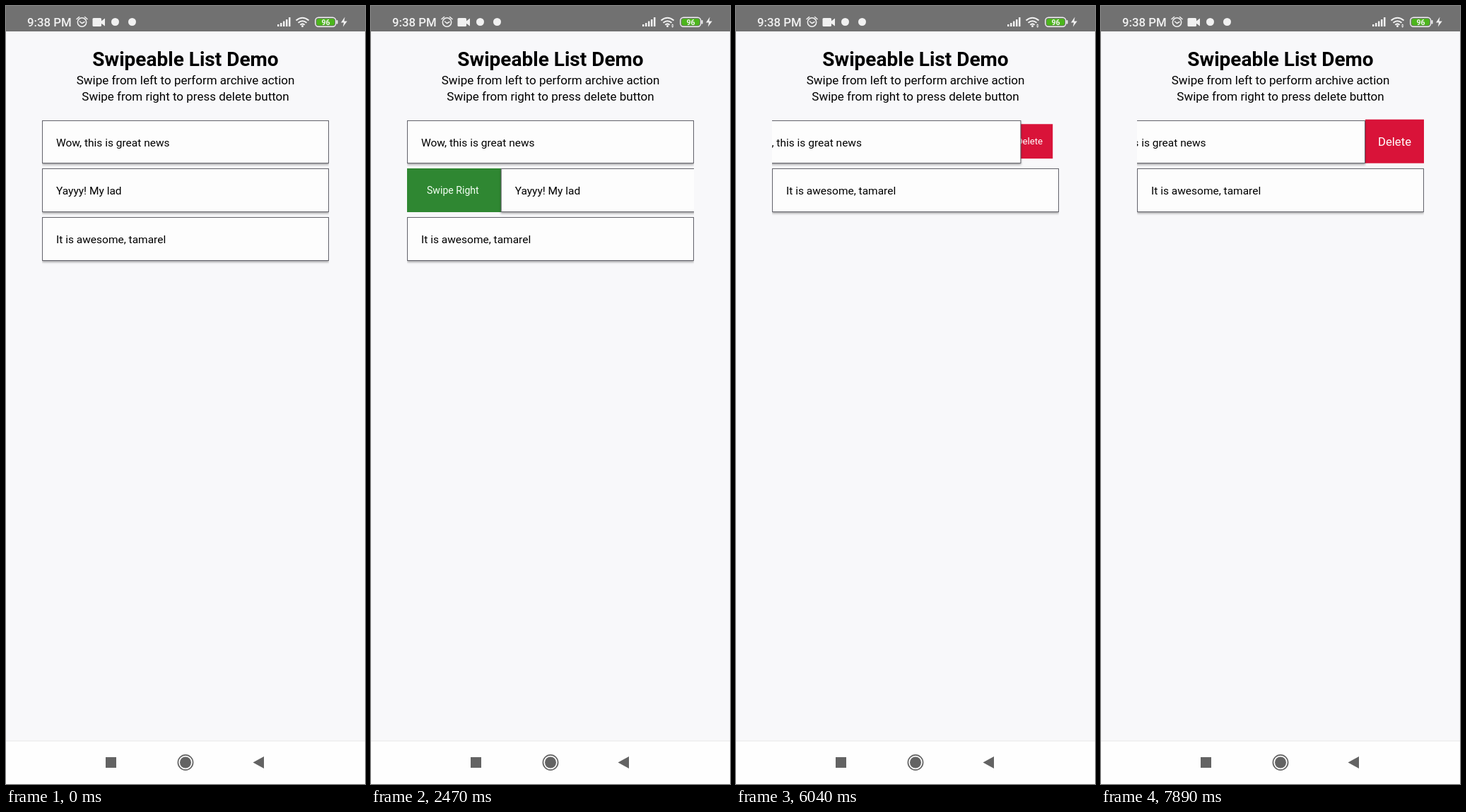
These frames come from a looping animation (508x1102 px, 8 s). An HTML page:

```html
<!DOCTYPE html>
<html lang="en">
<head>
<meta charset="utf-8">
<title>Swipeable List Demo</title>
<style>
  html, body { margin: 0; width: 100%; height: 100%; overflow: hidden; background: #f8f8fa; }
  svg { display: block; font-family: Roboto, sans-serif; }
  .item { font-size: 15.5px; }
  .card rect { fill: #fdfdfd; stroke: #62626a; filter: drop-shadow(0 2px 1.6px rgba(0, 0, 0, .32)); }
</style>
</head>
<body>
<svg id="stage" width="508" height="1102" viewBox="0 0 508 1102">
  <rect width="508" height="1102" fill="#f8f8fa"/>

  <!-- status bar -->
  <rect width="508" height="36" fill="#717171"/>
  <g fill="#f1f1f1">
    <text x="30" y="28.5" font-size="16.8" font-weight="500">9:38 PM</text>
    <g fill="none" stroke="#f1f1f1" stroke-width="1.5" stroke-linecap="round">
      <circle cx="107.5" cy="23" r="6.2"/>
      <path d="M104.5 22l3 2.5 3.5-2M100 18.500l3.500-3M115 18.500l-3.500-3"/>
    </g>
    <rect x="122.500" y="17" width="12.500" height="12" rx="1.500"/>
    <path d="M134 22l6-4.500v11l-6-4.500z"/>
    <circle cx="154.500" cy="22.500" r="5.500"/>
    <circle cx="178.500" cy="22.500" r="5.500"/>
    <path d="M384 26h2.500v3H384zM388 24h2.500v5H388zM392 21.500h2.500V29H392zM396 19h2.500v10H396zM400 16h2.500v13H400z"/>
    <g fill="none" stroke="#f1f1f1" stroke-width="2">
      <path d="M410.500 20.500q9-7.500 18 0M413.500 23.700q6-5 12 0M416.300 26.700q3.200-2.600 6.400 0"/>
    </g>
    <circle cx="419.500" cy="28.500" r="1.500"/>
    <path id="traffic" d="M425 27.500l1.700-2.300 1.700 2.300zM425 28.500h3.400l-1.700 2.300z"/>
    <rect x="437.700" y="16.200" width="29" height="13" rx="4.500" fill="#717171" stroke="#f1f1f1" stroke-width="1.400"/>
    <rect x="439.500" y="18" width="25.500" height="9.500" rx="3" fill="#4cb51c"/>
    <rect x="467.500" y="20" width="2" height="5.500" rx="1"/>
    <text x="452.500" y="26.500" font-size="10.500" font-weight="700" text-anchor="middle">96</text>
    <path d="M479.500 15.500l-5.500 8h4l-1.200 6 6-8h-4.300z"/>
  </g>

  <!-- heading -->
  <g text-anchor="middle">
    <text x="254" y="84.500" font-size="28" font-weight="700">Swipeable List Demo</text>
    <text x="254" y="110.500" font-size="17">Swipe from left to perform archive action</text>
    <text x="254" y="134" font-size="17">Swipe from right to press delete button</text>
  </g>

  <g id="list"></g>

  <!-- navigation bar -->
  <rect y="1041" width="508" height="61" fill="#fefefe"/>
  <rect y="1040.500" width="508" height="1" fill="#e9e9e9"/>
  <g fill="#636363">
    <rect x="141" y="1064" width="15" height="15"/>
    <circle cx="254" cy="1071.500" r="8"/>
    <circle cx="254" cy="1071.500" r="10.600" fill="none" stroke="#636363" stroke-width="1.700"/>
    <path d="M349.500 1071.500l15.500-8.500v17z"/>
  </g>
</svg>

<script>
const LOOP = 8000, WIDTH = 406, BUTTON = 83, REMOVED_AT = 2960;
const list = document.getElementById('list');
const traffic = document.getElementById('traffic');

// Each card slides over a green panel (left) and a red button (right).
function addRow(label, top, height) {
  list.insertAdjacentHTML('beforeend', `
    <svg x="51" y="${top - 4}" width="${WIDTH}" height="72"><g transform="translate(0 4)">
      <g class="archive">
        <rect width="${WIDTH}" height="${height + 1}" fill="#2f8732"/>
        <text x="28" y="36" font-size="14.1" fill="#f4fff4">Swipe Right</text>
      </g>
      <g class="delete">
        <rect x="-41.500" y="-31" width="83" height="62" fill="#d91339"/>
        <text y="6" font-size="16.700" fill="#fff" text-anchor="middle">Delete</text>
      </g>
      <g class="card">
        <rect x=".5" y=".5" width="405" height="${height}"/>
        <text class="item" x="20" y="37">${label}</text>
      </g>
    </g></svg>`);
  const root = list.lastElementChild;
  const part = name => root.querySelector('.' + name);
  return { root, card: part('card'), archive: part('archive'), remove: part('delete') };
}

const first = addRow('Wow, this is great news', 162, 60);
const second = addRow('Yayyy! My lad', 230, 61);
const third = addRow('It is awesome, tamarel', 299, 61);

const linear = p => p;
const smooth = p => p * p * (3 - 2 * p);
const settle = p => 1 - (1 - p) ** 3;

// Steps are [time, offset, easing used to get there].
const firstPath = [
  [3950, 0], [4230, -BUTTON, settle],
  [6000, -BUTTON, linear], [6040, -55, linear], [6360, 95, settle], [6740, -BUTTON, smooth],
  [6820, -BUTTON, linear], [7220, 120, smooth], [7440, 98, smooth], [7640, -25, smooth],
  [7680, -25, linear], [7890, -BUTTON, settle]
];
const secondPath = [[2140, 0], [2560, 150, smooth], [2920, WIDTH, settle]];

function follow(path, t) {
  const next = path.findIndex(step => t < step[0]);
  if (next === 0) return path[0][1];
  if (next < 0) return path[path.length - 1][1];
  const [t0, x0] = path[next - 1], [t1, x1, ease] = path[next];
  return x0 + (x1 - x0) * ease((t - t0) / (t1 - t0));
}

const show = (node, visible) => node.setAttribute('visibility', visible ? 'inherit' : 'hidden');

function slide(row, x) {
  const scale = Math.min(1, Math.max(0, -x / 68));
  row.card.setAttribute('transform', `translate(${x} 0)`);
  row.remove.setAttribute('transform', `translate(364.5 29.7) scale(${scale})`);
  show(row.archive, x > 0);
  show(row.remove, x < 0);
}

function draw() {
  const t = performance.now() % LOOP;
  const removed = t >= REMOVED_AT;
  slide(first, follow(firstPath, t));
  slide(second, follow(secondPath, t));
  slide(third, 0);
  show(second.root, !removed);
  third.root.setAttribute('y', removed ? 226 : 295);
  show(traffic, t >= 450);
  requestAnimationFrame(draw);
}
draw();
</script>
</body>
</html>
```
